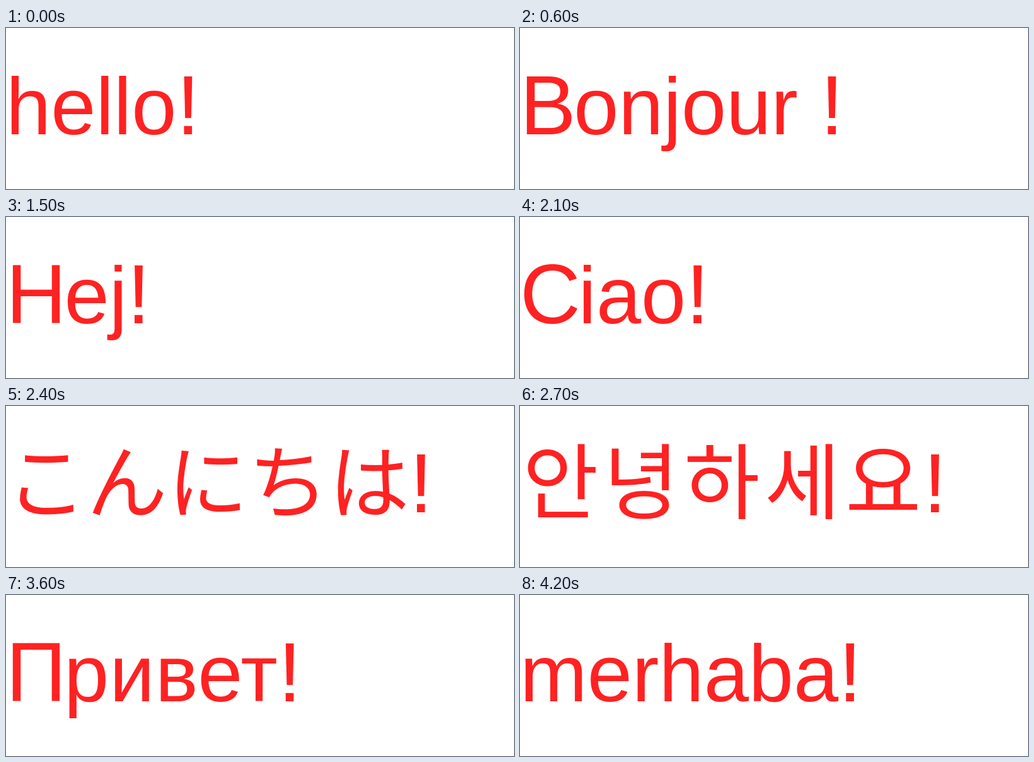
An HTML page that plays this animation: 806x256 px, repeating every 4500 ms.

```html
<!DOCTYPE html>
<html lang="en">
<head>
<meta charset="utf-8">
<title>Greetings</title>
<style>
  html, body { margin: 0; width: 100%; height: 100%; overflow: hidden; background: #fff; }
  svg { display: block; width: 806px; height: 256px; fill: #f22; }
  text { font: 128px "Liberation Sans", Arial, sans-serif; white-space: pre; }
  .tall { font-size: 133px; letter-spacing: -.027em; }
  .ru { letter-spacing: 1px; }
  .ja { font-family: "Noto Sans CJK JP", "Noto Sans CJK", sans-serif; }
  .ko { font-family: "Noto Sans CJK KR", "Noto Sans CJK", sans-serif; font-size: 131px; letter-spacing: 7.5px; }
  .fa { font-family: "DejaVu Sans", sans-serif; }
</style>
</head>
<body>
<svg id="stage" viewBox="0 0 806 256"></svg>
<script>
const STEP = 300;
const BASE = 169;

const text = (body, x = 0, cls = '') =>
  `<text x="${x}" y="${BASE}" class="${cls}">${body}</text>`;

// Capitals and "!" reach the ascender line.
const word = (s, x, cls) =>
  text(s.replace(/[A-ZП!]/g, c => `<tspan class="tall">${c}</tspan>`), x, cls);

// A word in another script, followed by "!" at its own position.
const mixed = (s, cls, x, end) => text(s, x, cls) + word('!', end);

const stem = x => `M${x} 95h9.5v76h-2l-7.5 -9z`;

const namaste = () => {
  const parts = [
    'M0 91H315.5V100H0z',
    stem(48), stem(129), stem(212), stem(287),
    // na
    'M50 119H19C9 119 5 124 5 129C5 137 14 149 19 149C22 149 22 147 21 140C20 131 22 128 27 128H50z',
    // ma
    'M94 95H103.500V129H131V138H103.500V149C103.500 153 101 153 98 150L84 137C80 133 81 129 85 129H94z',
    // sa
    'M176 98C181 107 179 118 174 123C168 120 162 121 162 126C162 140 181 157 193 170L196 167L175 143C179 139 181 136 182 133C193 137 204 136 213 130V122C205 129 194 128 184 125C187 116 187 107 183 98z',
    // virama
    'M207 173H212C230 173 242 186 243 204H240C236 191 226 182 210 183z',
    // ta
    'M289 115H270C252 115 247 122 247 133C247 148 260 159 273 171L275 168C263 157 255 147 255 136C255 127 260 124 270 124H289z',
    // vowel sign e
    'M246 54H252C272 54 280 72 295 92H291C278 74 270 64 250 65z'
  ];
  return `<g role="img" aria-label="नमस्ते">${parts.map(d => `<path d="${d}"/>`).join('')}</g>`
    + word('!', 315);
};

const greetings = [
  word('hello!'),
  mixed('سلام', 'fa', 7, 329.5),
  word('Bonjour !'),
  word('Hallo!'),
  namaste(),
  word('Hej!'),
  word('Dia duit!'),
  word('Ciao!'),
  mixed('こんにちは', 'ja', 0, 640),
  mixed('안녕하세요', 'ko', 4, 640),
  word('Hallo!'),
  word('Olá!'),
  word('Привет!', 0, 'ru'),
  word('¡Hola!'),
  word('merhaba!')
];

const stage = document.getElementById('stage');
stage.innerHTML = greetings.map(g => `<g>${g}</g>`).join('');
const slides = [...stage.children];
const start = performance.now();

function draw() {
  const now = Math.floor((performance.now() - start) / STEP) % slides.length;
  slides.forEach((g, i) => { g.style.display = i === now ? '' : 'none'; });
  requestAnimationFrame(draw);
}
draw();
</script>
</body>
</html>
```
